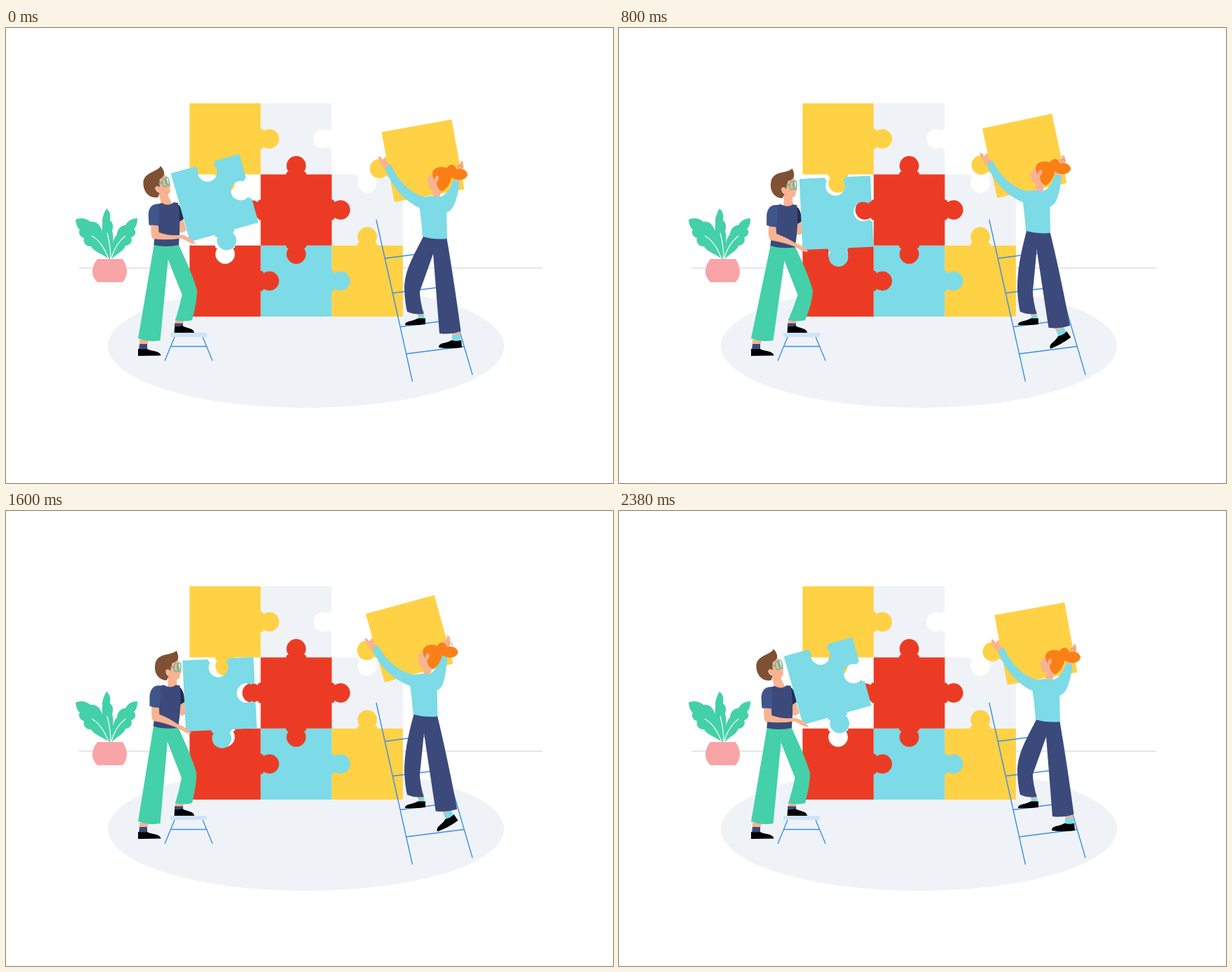
Recreate the animation shown at these times as an HTML page with a canvas. Size 864x648 px, loop 2400 ms.

```html
<!DOCTYPE html>
<html lang="en">
<head>
<meta charset="utf-8">
<title>Puzzle builders</title>
<style>
  html, body { margin: 0; width: 100%; height: 100%; overflow: hidden; background: #fff; }
  canvas { display: block; }
</style>
</head>
<body>
<canvas id="stage" width="864" height="648"></canvas>
<script>
const ctx = document.getElementById('stage').getContext('2d');
const LOOP = 2400;
const YELLOW = '#ffd145', TEAL = '#7cdbe6', RED = '#ec3b24', PALE = '#eff3f8';
const GREEN = '#44d0a8', NAVY = '#3b4a7b', SLEEVE = '#40558a', DARK = '#222c54';
const SKIN = '#f8b391', BROWN = '#7f5034', ORANGE = '#fa7f17', BLUE = '#3d8ee6';

// Pose keys: one value per time, the last one wraps to the first.
const TIMES = [0, 240, 580, 1020, 1360, 1840];
const KEYS = {
  teal:   [[297, 306.5, 310.4, 308.5, 308, 299.7], [242, 257, 265, 261.5, 265.5, 254], [-15.7, -4.9, -2.4, -2.8, .7, -8]],
  yellow: [[593.5, 586, 573, 581.3, 575, 574], [189, 187, 181, 183, 183, 180.7], [-10.3, -13.9, -13.8, -10.3, -16.2, -13.8]],
  torso:  [[-3, 0, 2.5, .5, -1.5, -5.5], [0, 0, 3.5, 0, -1.5, -1], [-3, 0, .5, .5, 1.5, -1]],
  head:   [[-15, 0, 7, 2, 7, -8], [6, 0, 5, 1, 1, 3], [-14, 0, 0, 0, 2, -4]],
  hips:   [[0, -5, -15, -12.5, -12, -15], [0, -3, -8.5, -7.5, -6.5, -8.5]]
};

// Periodic monotone cubic interpolation.
function sample(values, t) {
  const n = TIMES.length;
  const wrap = i => (i + n) % n;
  const span = i => (wrap(i) === n - 1 ? LOOP : TIMES[wrap(i) + 1]) - TIMES[wrap(i)];
  const secant = i => (values[wrap(i + 1)] - values[wrap(i)]) / span(i);
  const slope = i => {
    const a = secant(i - 1), b = secant(i);
    return a * b <= 0 ? 0 : 2 * a * b / (a + b);
  };
  let k = n - 1;
  while (TIMES[k] > t) k--;
  const h = span(k), u = (t - TIMES[k]) / h, v = 1 - u;
  return v * v * (1 + 2 * u) * values[k] + u * u * (3 - 2 * u) * values[wrap(k + 1)]
    + h * u * v * (v * slope(k) - u * slope(k + 1));
}

function fill(path, color) {
  ctx.fillStyle = color;
  ctx.fill(new Path2D(path));
}
function stroke(path, color, width = 1.4) {
  ctx.strokeStyle = color;
  ctx.lineWidth = width;
  ctx.stroke(new Path2D(path));
}
// Moves by x, y and turns by degrees around a pivot.
function group([x, y, angle], [px, py], draw) {
  ctx.save();
  ctx.translate(px + x, py + y);
  ctx.rotate(angle * Math.PI / 180);
  ctx.translate(-px, -py);
  draw();
  ctx.restore();
}
function locate([x, y, angle], px, py) {
  const a = angle * Math.PI / 180, c = Math.cos(a), s = Math.sin(a);
  return [x + px * c - py * s, y + px * s + py * c];
}

// Sides are top, right, bottom, left: 1 knob, -1 socket, 0 flat.
const PITCH = 101.2, HALF = PITCH / 2;
function jigsaw(sides) {
  const turns = [(x, y) => [x, y], (x, y) => [-y, x], (x, y) => [-x, -y], (x, y) => [y, -x]];
  return sides.map((kind, i) => {
    const p = (x, out) => turns[i](x, -HALF - out * kind).join();
    const corner = (i ? 'L' : 'M') + p(-HALF, 0);
    if (!kind) return corner;
    return `${corner}L${p(-14.5, 0)}C${p(-14.5, 2.5)} ${p(-12.5, 4.5)} ${p(-11, 4)}`
      + `A13.8,13.8 0 1 ${kind > 0 ? 1 : 0} ${p(11, 4)}C${p(12.5, 4.5)} ${p(14.5, 2.5)} ${p(14.5, 0)}`;
  }).join('') + 'Z';
}
const BOARD = [
  [1, 0, PALE, [0, -1, 0, 0]], [2, 1, PALE, [-1, 0, 0, 0]],
  [2, 2, YELLOW, [1, 0, 0, 0]], [1, 2, TEAL, [0, 1, 0, 0]],
  [0, 2, RED, [-1, 1, 0, 0]], [1, 1, RED, [1, 1, 1, 1]], [0, 0, YELLOW, [0, 1, 1, 0]]
];
function piece(pose, color, sides) {
  group(pose, [0, 0], () => fill(jigsaw(sides), color));
}

function drawRoom() {
  stroke('M104,342H764', '#dcdee1', 1.5);
  fill('M145,453A282,88 0 0 1 709,453A282,88 0 0 1 145,453Z', PALE);
  fill('M148,330C142,315 138,305 138,296C135,288 138,281 137,274C138,266 141,261 143,257C149,262 149,268 148,274C153,278 153,284 151,289C154,297 152,312 149,330Z', GREEN);
  fill('M147,330C145,312 142,298 137,290C134,279 127,275 120,276C114,270 104,270 99,273C100,279 101,284 105,287C102,292 106,298 111,299C109,306 115,312 121,311C126,320 138,321 147,330Z', GREEN);
  fill('M150,330C150,312 152,300 158,294C158,286 165,280 170,281C174,273 182,271 187,271C187,277 186,283 182,286C187,291 183,297 178,298C181,304 176,310 170,310C168,318 157,321 150,330Z', GREEN);
  stroke('M146,329C140,312 131,301 122,296M149,329C149,315 147,303 144,292M150,329C153,315 160,304 170,296', '#fff', 1.2);
  fill('M130,329H166Q172,338 172,347Q172,355 166,362H130Q123,355 123,347Q123,338 130,329Z', '#f9a4a6');
  for (const [col, row, color, sides] of BOARD)
    piece([261.3 + HALF + col * PITCH, 107.3 + HALF + row * PITCH, 0], color, sides);
}

function drawStool() {
  stroke('M240,440L226,474M280,440L294,474M235,453.5H285', BLUE);
  fill('M234,434H286V440H234Z', '#cfe3fa');
}

function drawLadder() {
  stroke('M527,273L578.5,503.5M613,320L664,494M540,328L616,318M550,377.5L628,368M561,425.5L640,415M570,464L652,453.5', BLUE);
}

function drawMan(tealPose, torso, head) {
  const [x, y, lean] = torso, hip = [231, 310];
  group(torso, hip, () => {
    fill('M248,272L257,273L261,290L253,293Q247,287 248,272Z', SKIN);
    fill('M246,250Q255,252 257,264L258,273L250,278Z', DARK);
  });
  piece(tealPose, TEAL, [-1, -1, 1, 0]);
  drawStool();

  fill('M190,444H203L201,452H190Z', SKIN);
  fill('M190,450H201V459H189Z', NAVY);
  fill('M188,457Q195,458 201,457C207,461 219,459 220.5,466.5L188,467Z', '#000');
  fill('M241,414H253L252,422H241Z', SKIN);
  fill('M240,420.5H252V427H240Z', NAVY);
  fill('M240,425Q246,426 251,424C257,428 267,427 268,434H239.5Z', '#000');
  fill(`M${214 + x},${307 + y}H${240 + x}L${234 + x},${327 + y}L219.5,445Q203,448 188,442Z`, GREEN);
  fill(`M${226 + x},${307 + y}H${248 + x}C${256 + x},${325 + y} ${268 + x * .8},350 ${274.5 + x * .8},374
    Q${274 + x * .8},391 265,416Q252,419 241,416Q${248 + x * .4},398 ${253 + x * .8},380L${233 + x},${328 + y}Z`, GREEN);

  group(head, [212, 222], () => {
    fill('M230,228L242,235L242.5,243L245,254H228L230,246Z', SKIN);
  });
  group(torso, hip, () => {
    fill('M216,252Q223,250 228,249Q238,255 245,249L251,250Q254,275 249,310Q230,313 213.5,308Q216,295 216,280Z', NAVY);
    fill('M223,250Q210,249 208,264V279Q215,283 222,281Q225,265 223,250Z', SLEEVE);
  });

  const corner = locate(tealPose, -HALF, HALF);
  const hx = corner[0] + 8, hy = corner[1] + 3, ax = x + lean * .5;
  fill(`M${211 + ax},${280.5 + y}L${221.5 + ax},${281.5 + y}L${222 + ax},${291 + y}
    Q${238 + ax},${297 + y} ${hx - 19},${hy - 13}Q${hx - 8},${hy - 10} ${hx},${hy - 1}
    Q${hx - 3},${hy + 1} ${hx - 9},${hy - 2}L${hx - 20},${hy - 8}
    Q${231 + ax},${303 + y} ${213 + ax},${300 + y}Q${210 + ax},${295 + y} ${211 + ax},${280.5 + y}Z`, SKIN);

  group(head, [212, 222], () => {
    fill('M231,214L244,209Q247,215 246.5,221L249.5,228L247,230Q248,238 241,239Q235,240 230,233Z', SKIN);
    fill('M242,197C236,204 219,200 213,212C208,226 215,239 228,239.5L231,234Q226,230 227,225Q232,222 233,227L236,215C245,213 247,207 242,197Z', BROWN);
    fill('M233,226Q228,222 227,226Q228,232 232,232Z', SKIN);
    stroke('M233,221L239,220M238.5,221.5A3,6 0 1 0 244.5,221.5A3,6 0 1 0 238.5,221.5M243.5,220.5A2.5,6 0 1 0 248.5,220.5A2.5,6 0 1 0 243.5,220.5', '#3dbd9d', 1.3);
  });
}

function drawWoman(yellowPose, [x, y]) {
  piece(yellowPose, YELLOW, [0, 0, 0, 1]);
  drawLadder();
  group(yellowPose, [0, 0], () => {
    fill('M-55,3C-59,-3 -62,-10 -61.5,-17Q-58,-18 -56,-11Q-53,-16 -51.5,-13Q-52,-7 -46,-2Z', SKIN);
    fill('M38,37L46,18Q47,12 50,16L53,10Q57,11 55.5,18L47,37Z', SKIN);
  });

  fill('M586,403H595V410H586Z', SKIN);
  fill('M587,408.5H595.5V415H587Z', TEAL);
  fill('M568,423C568,417 579,418 586,413.5H597V422Q583,424 568,423Z', '#000');
  group([616 + x * .12, 455 - y * .2, x * 2.1], [0, 0], () => {
    fill('M19,-24H30L31,-14H20Z', SKIN);
    fill('M19,-18H31V-8H19Z', TEAL);
    fill('M0,0C0,-8 11,-5 18,-10.5Q25,-8 32,-10.5L33,0Q16,2.5 0,0Z', '#000');
  });

  fill(`M${594 + x},${297 + y}C${580 + x * .6},${325 + y * .5} 567,345 567,372Q568,392 571,404
    Q582,409 594.5,407Q589,387 589,375L${609 + x},${319 + y}L${625 + x},${299 + y}Z`, NAVY);
  const hemX = x * .4;
  fill(`M${600 + x},${297 + y}H${627 + x}Q${637 + x * .7},${355 + y} ${647.5 + hemX},${432 + y}
    Q${633 + hemX},${437 + y} ${617 + hemX},${435 + y}L${608 + x},${321 + y}Z`, NAVY);

  const [rx, ry] = locate(yellowPose, 41.7, 36);
  fill(`M${rx - 5},${ry - 1}L${rx + 4.5},${ry + 2}C${rx + 2},${ry + 24} ${638 + x},${261 + y} ${626 + x},${263 + y}
    L${614 + x},${242 + y}Q${rx - 9},${ry + 20} ${rx - 5},${ry - 1}Z`, TEAL);
  const [lx, ly] = locate(yellowPose, -50.3, 0);
  const mx = (lx - 544 + x) / 2, my = (ly - 198 + y) / 2;
  fill(`M${lx - 4},${ly + 4}Q${lx - 1},${ly - 4} ${lx + 4},${ly - 3}Q${565 + mx},${232 + my} ${596 + x},${241 + y}
    L${590 + x},${257 + y}Q${557 + mx},${242 + my} ${lx - 4},${ly + 4}Z`, TEAL);

  group([x, y, 0], [0, 0], () => {
    fill('M592,241L606,239L620,240Q630,250 627,263L628,300Q610,302 593,297Q591,270 588,252Z', TEAL);
    fill('M608,205C603,210 601,213 599,218L601,221C601,227 602,230 607,230L608,239Q613,242 618,239L620,228L622,208Z', SKIN);
    fill('M607,207C608,197 622,196 631,201C637,208 635,224 621,233Q613,229 613,220Q607,215 607,207Z', ORANGE);
    fill('M610,216Q612,208 616,211Q617,217 612,220Z', SKIN);
    fill('M626,202C630,192 639,193 641,201C649,199 656,202 657,209C654,218 641,219 632,211Z', ORANGE);
    stroke('M644,198A2.5,2.5 0 1 1 648,199.5', ORANGE, 1);
  });
}

function frame(now) {
  const t = now % LOOP, pose = {};
  for (const name in KEYS) pose[name] = KEYS[name].map(values => sample(values, t));
  ctx.fillStyle = '#fff';
  ctx.fillRect(0, 0, 864, 648);
  drawRoom();
  drawMan(pose.teal, pose.torso, pose.head);
  drawWoman(pose.yellow, pose.hips);
  requestAnimationFrame(frame);
}
frame(0);
</script>
</body>
</html>
```
